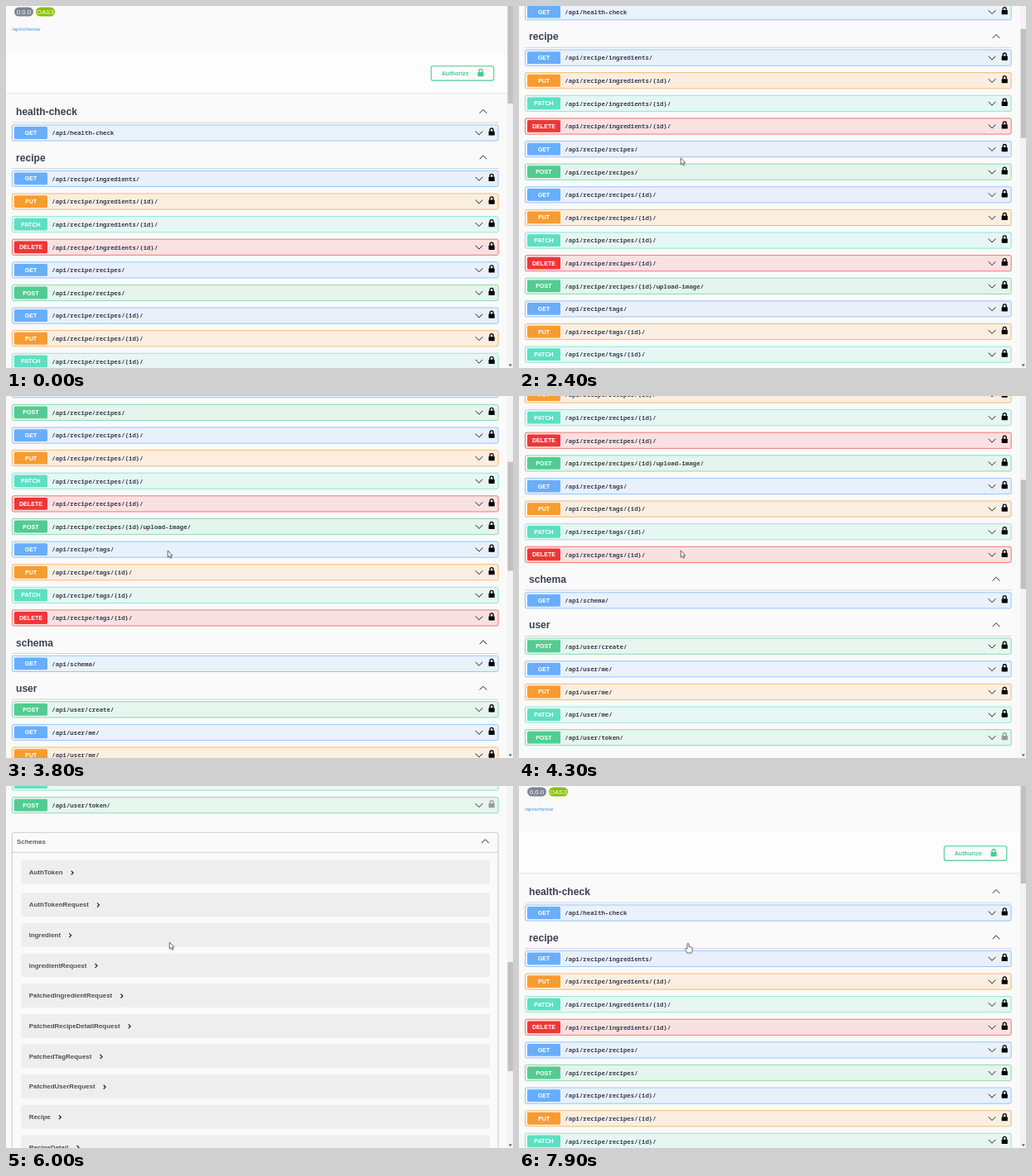
Write an HTML page that moves like this. It is 612 by 438 pixels and loops after 8000 ms.

```html
<!DOCTYPE html>
<html lang="en">
<head>
<meta charset="utf-8">
<title>API docs</title>
<style>
@property --scroll { syntax: "<number>"; inherits: true; initial-value: 0; }
html, body { margin: 0; width: 100%; height: 100%; overflow: hidden; background: #fafafa; }
svg { display: block; width: 612px; height: 438px; animation: scroll 8s infinite; }
text { font-family: "Liberation Sans", Arial, sans-serif; font-weight: bold; }
.path { font: 600 7.37px "Noto Sans Mono", monospace; fill: #3b4151; }
.method { font-size: 7.1px; fill: #fff; text-anchor: middle; }
.tag { font-size: 12.1px; fill: #3b4151; }
.model { font-size: 7.95px; fill: #505050; }
.pill { font-size: 7.8px; fill: #fff; text-anchor: middle; font-weight: 400; }
.line { fill: none; stroke: #222; stroke-width: 1; }
#page { transform: translateY(calc(var(--scroll) * -1px)); }
#thumb { transform: translateY(calc(var(--scroll) * .286px)); }
#cursor { animation: move 8s infinite; }
#hand { animation: hand 8s step-end infinite; }
#arrow { animation: arrow 8s step-end infinite; }
#hover { animation: hover 8s step-end infinite; }

/* every segment advances in 100 ms ticks */
@keyframes scroll {
  0% { --scroll: 0; animation-timing-function: step-end; }
  11.25% { --scroll: 0; animation-timing-function: steps(6); }
  18.75% { --scroll: 57.5; animation-timing-function: steps(3); }
  22.5% { --scroll: 100; animation-timing-function: step-end; }
  25% { --scroll: 100; animation-timing-function: steps(13); }
  41.25% { --scroll: 250.5; animation-timing-function: steps(10); }
  53.75% { --scroll: 403.7; animation-timing-function: steps(10); }
  66.25% { --scroll: 552.5; animation-timing-function: steps(3); }
  70% { --scroll: 612; animation-timing-function: steps(7); }
  78.75% { --scroll: 930; animation-timing-function: step-end; }
  80% { --scroll: 930; animation-timing-function: steps(4); }
  85% { --scroll: 1088.7; animation-timing-function: step-end; }
  88.75% { --scroll: 1088.7; animation-timing-function: steps(7); }
  97.5%, 100% { --scroll: 0; }
}
@keyframes move {
  0% { transform: translate(300px, 428px); animation-timing-function: steps(8); }
  10% { transform: translate(194.5px, 170.3px); animation-timing-function: step-end; }
  25% { transform: translate(194.5px, 170.3px); animation-timing-function: steps(5); }
  31.25% { transform: translate(195px, 187px); animation-timing-function: step-end; }
  53.75% { transform: translate(195px, 187px); animation-timing-function: steps(10); }
  66.25% { transform: translate(196.5px, 189px); animation-timing-function: steps(18); }
  88.75% { transform: translate(198px, 189px); animation-timing-function: steps(8); }
  98.75%, 100% { transform: translate(204px, 190.3px); }
}
@keyframes hand {
  0% { opacity: 0; }
  1.25% { opacity: 1; }
  26.25% { opacity: 0; }
  97.5%, 100% { opacity: 1; }
}
@keyframes arrow {
  0% { opacity: 0; }
  26.25% { opacity: 1; }
  97.5%, 100% { opacity: 0; }
}
@keyframes hover {
  0% { opacity: 0; }
  10% { opacity: 1; }
  26.25%, 100% { opacity: 0; }
}
</style>
</head>
<body>
<svg viewBox="0 0 612 438">
  <defs>
    <g id="lock">
      <rect x="-3.6" y="-.8" width="7.2" height="5.2" rx=".6" fill="currentColor"/>
      <path d="M-2-.4V-2.3a2 2 0 0 1 4 0V-.4" fill="none" stroke="currentColor" stroke-width="1.3"/>
    </g>
    <path id="up" class="line" d="M-4.3 2.3L0-2.1L4.3 2.3"/>
    <path id="down" class="line" d="M-4.3-2.3L0 2.1L4.3-2.3"/>
    <path id="next" class="line" style="stroke-width:1.2" d="M-1.2-2.4L1.2 0L-1.2 2.4"/>
  </defs>
  <rect width="612" height="438" fill="#fafafa"/>
  <g id="page">
    <rect x="10" y="1.5" width="23" height="11" rx="5.5" fill="#7d8492"/>
    <text class="pill" x="21.5" y="9.8">0.0.0</text>
    <rect x="36" y="1.5" width="23" height="11" rx="5.5" fill="#89bf04"/>
    <text class="pill" x="47.5" y="9.8">OAS3</text>
    <text x="7" y="30" font-size="6.1" fill="#4990e2" style="font-weight:400">/api/schema/</text>
    <rect y="56" width="605" height="49.5" fill="#fdfdfd"/>
    <rect y="105.3" width="605" height="1" fill="#e4e4e4"/>
    <rect x="513.2" y="72.7" width="75.6" height="17.4" rx="2" fill="none" stroke="#49cc90" stroke-width="1.1"/>
    <text x="525.7" y="84" font-size="7.15" fill="#49cc90">Authorize</text>
    <use href="#lock" x="573" y="80.8" color="#49cc90"/>
  </g>
  <rect x="605" width="7" height="438" fill="#f3f3f3"/>
  <rect id="thumb" x="605.5" y="-14" width="6.5" height="132" fill="#c1c1c1"/>
  <rect x="605" y="431" width="7" height="7" fill="#f3f3f3"/>
  <path d="M606.8 433.6h4l-2 2.4z" fill="#505050"/>
  <g id="cursor" stroke="#444" stroke-width=".8" stroke-linejoin="round" fill="#fff">
    <path id="arrow" d="M.3 0V8.2L2.2 6.5L3.5 9.4L4.8 8.8L3.5 6H6z"/>
    <path id="hand" d="M-1 7V1Q-.9 0 0 0Q.9 0 1 1V4.2L4.3 4.8Q5.2 5 5.2 6V8.5Q5 10 4.3 11.8H-.9Q-1.7 9.5-3.4 7.7Q-3.7 6.5-2.6 6.3Q-1.8 6.3-1 7z"/>
  </g>
</svg>
<script>
const COLORS = { GET: "#68aefd", POST: "#52cc90", PUT: "#f89c30", PATCH: "#5ce0c2", DELETE: "#f03636" };
const SECTIONS = [
  ["health-check", [["GET", "health-check"]]],
  ["recipe", [
    ["GET", "recipe/ingredients/"],
    ["PUT PATCH DELETE", "recipe/ingredients/{id}/"],
    ["GET POST", "recipe/recipes/"],
    ["GET PUT PATCH DELETE", "recipe/recipes/{id}/"],
    ["POST", "recipe/recipes/{id}/upload-image/"],
    ["GET", "recipe/tags/"],
    ["PUT PATCH DELETE", "recipe/tags/{id}/"]
  ]],
  ["schema", [["GET", "schema/"]]],
  ["user", [["POST", "user/create/"], ["GET PUT PATCH", "user/me/"], ["POST", "user/token/"]]]
];
const MODELS = ["AuthToken", "AuthTokenRequest", "Ingredient", "IngredientRequest",
  "PatchedIngredientRequest", "PatchedRecipeDetailRequest", "PatchedTagRequest",
  "PatchedUserRequest", "Recipe", "RecipeDetail", "RecipeDetailRequest",
  "RecipeImageSerialazer", "RecipeImageSerialazerRequest", "Tag", "TagRequest", "User", "UserRequest"];

const page = document.getElementById("page");

function add(name, attrs, text) {
  const el = document.createElementNS("http://www.w3.org/2000/svg", name);
  for (const key in attrs) el.setAttribute(key, attrs[key]);
  if (text) el.textContent = text;
  page.append(el);
  return el;
}
const icon = (id, x, y, color = "#000") => add("use", { href: "#" + id, x, y, color });
const label = (kind, x, y, text) => add("text", { class: kind, x, y }, text);

function header(y, name) {
  if (name === "recipe")
    add("rect", { id: "hover", x: 7, y: y - 11, width: 587, height: 24, fill: "#f3f3f3" });
  label("tag", 12, y + 4.1, name);
  add("rect", { x: 7, y: y + 12.7, width: 587.5, height: .8, fill: "#3b4151", opacity: .25 });
  icon("up", 576, y - .5);
}

function row(y, method, path) {
  const color = COLORS[method];
  add("rect", { x: 7.4, y: y - 9.6, width: 586.8, height: 19.2, rx: 2, fill: color,
    "fill-opacity": .12, stroke: color, "stroke-opacity": .65 });
  add("rect", { x: 10, y: y - 7.4, width: 40, height: 14.8, rx: 1.6, fill: color });
  label("method", 30, y + 2.5, method);
  label("path", 55.3, y + 2.8, "/api/" + path);
  icon("down", 571, y + .3);
  icon("lock", 586.2, y - 1.3, path.endsWith("token/") ? "#999" : "#000");
}

let y = 128;
for (const [name, groups] of SECTIONS) {
  header(y, name);
  y += 25.5;
  for (const [methods, path] of groups)
    for (const method of methods.split(" ")) {
      row(y, method, path);
      y += 27.62;
    }
  y += 2.3;
}

add("rect", { x: 7.4, y: 850, width: 586.8, height: 662, rx: 2, fill: "none", stroke: "#3b4151", "stroke-opacity": .25 });
add("rect", { x: 7.4, y: 873.6, width: 586.8, height: .8, fill: "#3b4151", opacity: .25 });
label("model", 13, 863.3, "Schemas").style.fill = "#606060";
icon("up", 578.5, 860.5);
MODELS.forEach((name, i) => {
  const mid = i ? 937.3 + (i - 1) * 36.67 : 898.2;
  add("rect", { x: 18, y: mid - 14.4, width: 566, height: 28.8, rx: 2, fill: "#eee" });
  const text = label("model", 27.7, mid + 2.6, name);
  icon("next", 27.7 + text.getComputedTextLength() + 11.4, mid + .5);
});
</script>
</body>
</html>
```
